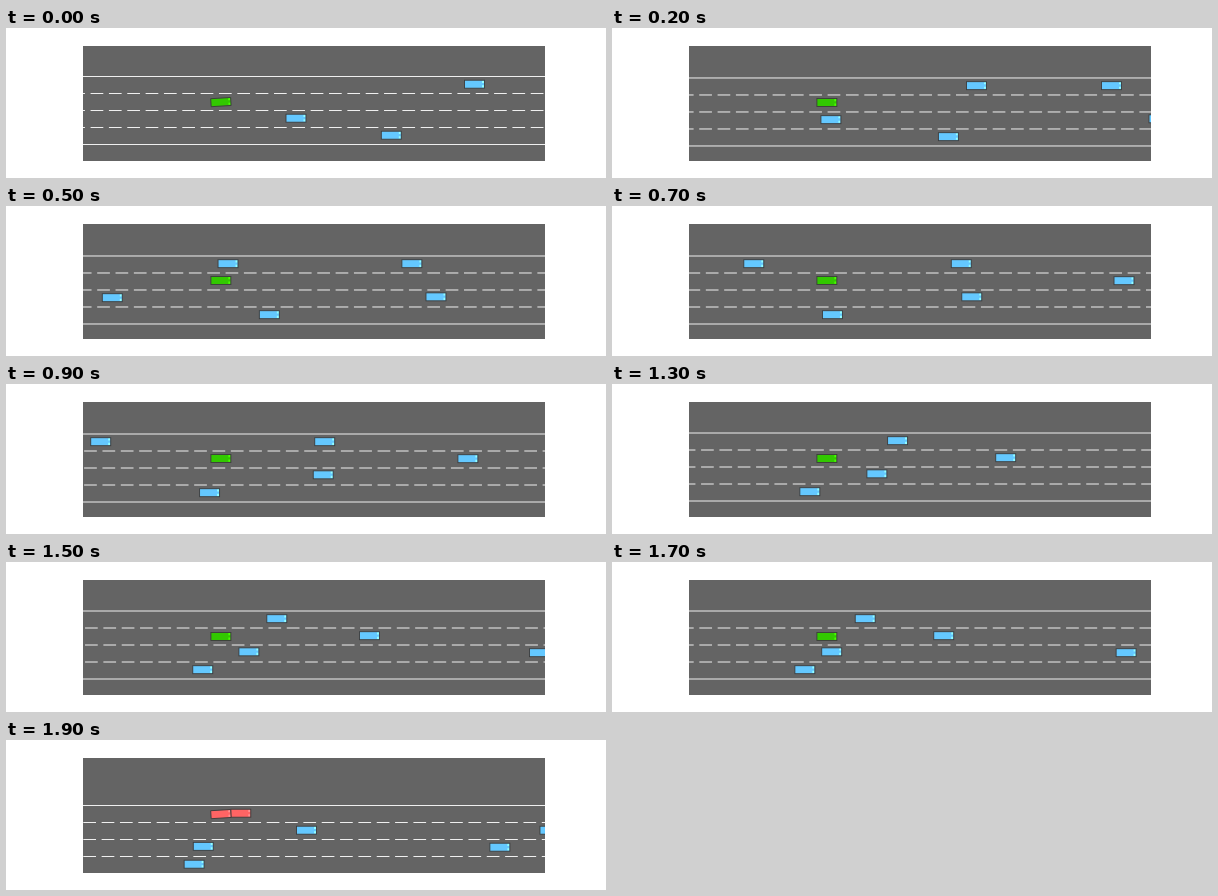
Recreate the animation shown at these times as an HTML page. Size 600 by 150 pixels, loop 2000 ms.

```html
<!DOCTYPE html>
<html lang="en">
<head>
<meta charset="utf-8">
<title>Highway traffic</title>
<style>
  html, body { margin: 0; width: 100%; height: 100%; overflow: hidden; background: #fff; }
  svg { display: block; width: 600px; height: 150px; }
</style>
</head>
<body>
<svg id="stage" viewBox="0 0 600 150">
  <defs><clipPath id="view"><rect x="77" y="18" width="462" height="115"/></clipPath></defs>
  <g id="scene" clip-path="url(#view)">
    <rect x="77" y="18" width="462" height="115" fill="#646464"/>
  </g>
</svg>
<script>
const STEP = 100, STEPS = 20;
const LEFT = 77, RIGHT = 539, LANE = 17, DASH = 12.7, PERIOD = 18.34;
const BLUE = ['#64c8ff', '#93ffff'], GREEN = ['#32c800', '#49ff00'], RED = ['#ff6464', '#ff9393'];

// Start position, speed and acceleration relative to the camera, in pixels and steps
const traffic = [
  { lane: 0, x: 468.5, v: -53.8, a: 0.89 },
  { lane: 0, x: 562.1, v: -31.3, a: 0 },
  { lane: 2, x: 290, v: -34.7, a: -0.42 },
  { lane: 1.95, x: 627.2, v: -40.5, a: 0.2 },
  { lane: 3, x: 385.3, v: -24.45, a: 0 },
  { lane: 1, x: 804, v: -43.8, a: 0.17 },
  { lane: 2, x: 838.3, v: -32.2, a: 0 },
  { lane: 1, x: 998.6, v: -38, a: 0 }
];
const CRASHED = 1;

const scene = document.getElementById('scene');

function set(el, attrs) {
  for (const key in attrs) el.setAttribute(key, attrs[key]);
}

function add(parent, tag, attrs) {
  const el = document.createElementNS('http://www.w3.org/2000/svg', tag);
  set(el, attrs);
  return parent.appendChild(el);
}

// Ground the other cars regain as the green car brakes, first hard and then once more lightly
function braking(n) {
  const hard = 13.2 * Math.log(1 + Math.exp((n - 7.3) / 0.6));
  const light = 10 / (1 + Math.exp(13 - n));
  return hard + light;
}

// Top edge of the road: settles after a lane change, then drifts, then shifts one lane
function roadTop(n, crash) {
  if (crash) return 65.5;
  return 50 - 1.5 * Math.exp(-2 * n) - (n > 9 ? 1 : 0);
}

function dashStart(n) {
  const drift = 84.6 + 1.32 * n + 2.83 * Math.max(0, n - 11);
  return LEFT - PERIOD + (drift - LEFT) % PERIOD;
}

function makeCar() {
  const box = { x: -10, y: -4, width: 20, height: 8 };
  const g = add(scene, 'g', {});
  const body = add(g, 'rect', box);
  const lamps = add(g, 'path', { d: 'M7.5-3.5h2v2.2h-2zM7.5 1h2v2.2h-2z' });
  add(g, 'rect', { ...box, fill: 'none', stroke: '#3c3c3c', 'stroke-width': 0.9 });
  return { g, body, lamps };
}

function placeCar(car, x, y, angle, [paint, light]) {
  set(car.g, { transform: `translate(${x} ${y}) rotate(${angle})` });
  set(car.body, { fill: paint });
  set(car.lamps, { fill: light });
}

const lines = Array.from({ length: 5 }, (_, i) => add(scene, 'line', {
  x1: LEFT, x2: RIGHT, stroke: '#fff', 'stroke-width': 0.9,
  'stroke-dasharray': i % 4 ? `${DASH} ${PERIOD - DASH}` : 'none'
}));
const cars = traffic.map(makeCar);
const ego = makeCar();

function draw(ms) {
  const n = Math.floor(ms / STEP) % STEPS;
  const crash = n === STEPS - 1, turning = n === 0 || crash;
  const top = roadTop(n, crash);

  lines.forEach((line, i) => {
    const y = top + i * LANE;
    set(line, { x1: i % 4 ? dashStart(n) : LEFT, y1: y, y2: y });
  });

  traffic.forEach(({ lane, x, v, a }, i) => {
    const paint = crash && i === CRASHED ? RED : BLUE;
    const y = top + (lane + 0.5) * LANE - 0.8;
    placeCar(cars[i], x + v * n + a * n * n + braking(n), y, 0, paint);
  });

  placeCar(ego, 214.9, turning ? 74.1 : 74.5, turning ? -3.5 : 0, crash ? RED : GREEN);
}

const start = performance.now();
function tick() {
  draw(performance.now() - start);
  requestAnimationFrame(tick);
}
tick();
</script>
</body>
</html>
```
